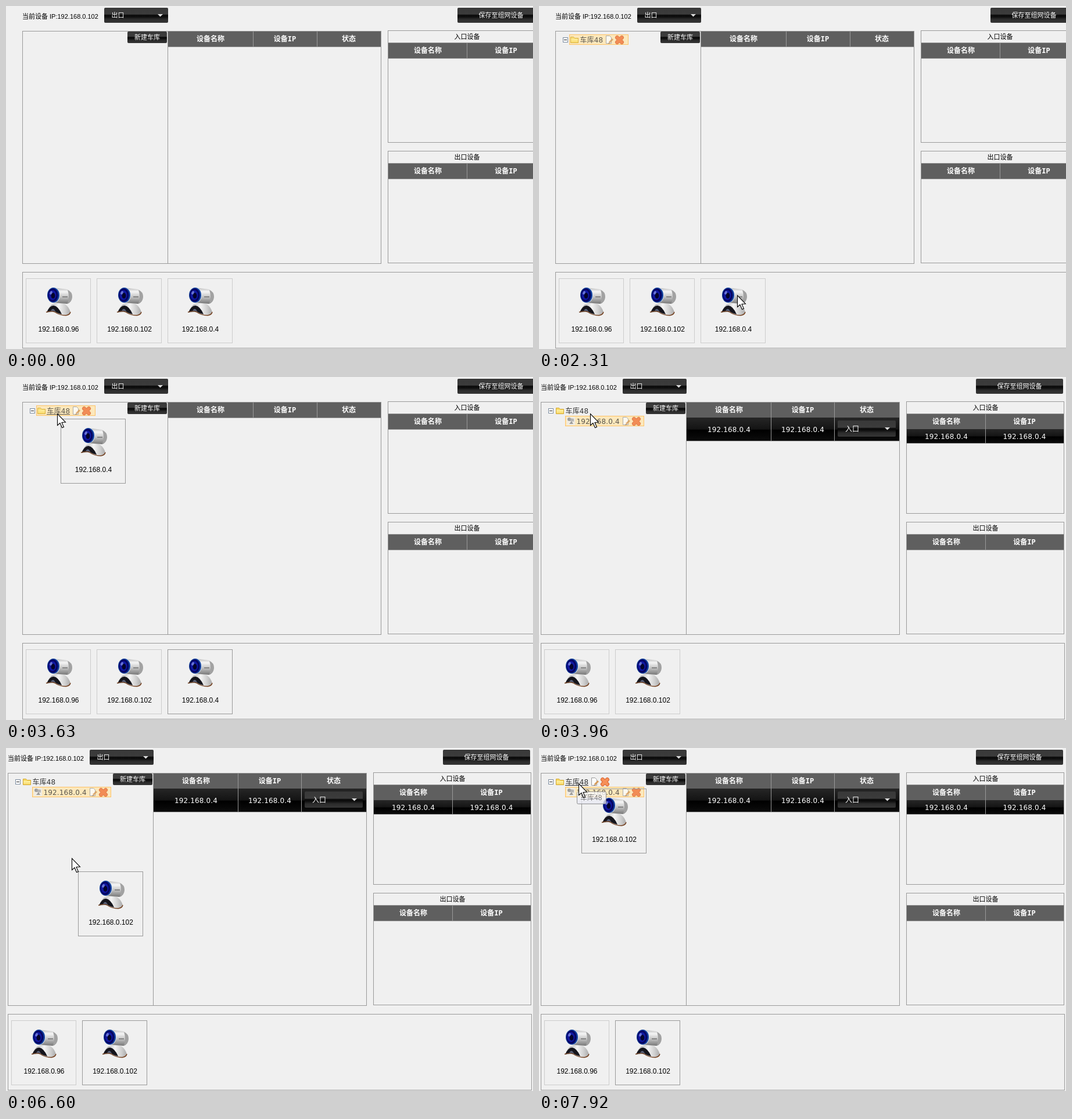
Write an HTML page with a canvas that moves like this. It is 907 px wide and 592 px high and loops after 8000 ms.

```html
<!DOCTYPE html>
<html lang="zh">
<head>
<meta charset="utf-8">
<title>设备组网</title>
<style>
html, body { margin: 0; width: 100%; height: 100%; overflow: hidden; background: #f0f0f0; }
canvas { display: block; }
</style>
</head>
<body>
<canvas id="stage" width="907" height="592"></canvas>
<script>
const ctx = document.getElementById('stage').getContext('2d');
const STEP = 330, LOOP = 8000;
const LINE = '#999', BG = '#f0f0f0';
const CJK = '"Noto Sans CJK SC", "Noto Sans CJK", sans-serif';
const ARIAL = '"Liberation Sans", ' + CJK;
const WIDE = '"DejaVu Sans", ' + CJK;
const HEAD = 'bold 12px "DejaVu Sans Mono", ' + CJK;
const SMALL = '11px ' + ARIAL;

// Each step: cursor position, dragged tile position, extra state.
const steps = [
  {},
  { at: [33, 263] },
  { at: [190, 107] },
  { at: [231, 59], button: 'hover' },
  { at: [231, 59], button: 'press' },
  { at: [231, 59], button: 'hover' },
  { at: [294, 270] },
  { at: [341, 499] },
  { at: [322, 475], drag: [329, 490] },
  { at: [149, 159], drag: [160, 189] },
  { at: [93, 72], drag: [100, 83] },
  { at: [88, 63], drag: [94, 72], hover: true },
  { at: [88, 63] },
  { at: [100, 85] },
  { at: [128, 157] },
  { at: [142, 376] },
  { at: [151, 481] },
  { at: [180, 532] },
  { at: [178, 520], drag: [186, 535] },
  { at: [160, 445], drag: [166, 468] },
  { at: [113, 190], drag: [124, 213] },
  { at: [82, 101], drag: [90, 115] },
  { at: [72, 65], drag: [77, 74], hover: true },
  { at: [68, 61], drag: [73, 70], hover: true },
  { at: [68, 61], drag: [73, 70], hover: true, tip: true }
];
const NODE_STEP = 5, DROP_STEP = 12;

function text(str, x, y, font, color = '#000', align = 'left', spacing = 0) {
  ctx.font = font;
  ctx.fillStyle = color;
  ctx.textAlign = align;
  ctx.letterSpacing = spacing + 'px';
  ctx.fillText(str, x, y);
}

function fill(x, y, w, h, color) {
  ctx.fillStyle = color;
  ctx.fillRect(x, y, w, h);
}

function frame(x, y, w, h, color = LINE) {
  ctx.strokeStyle = color;
  ctx.lineWidth = 1;
  ctx.strokeRect(x + 0.5, y + 0.5, w - 1, h - 1);
}

function shade(x0, y0, x1, y1, ...stops) {
  const g = ctx.createLinearGradient(x0, y0, x1, y1);
  stops.forEach(([p, c]) => g.addColorStop(p, c));
  return g;
}

function poly(points, color, stroke) {
  ctx.beginPath();
  points.forEach(([x, y]) => ctx.lineTo(x, y));
  ctx.closePath();
  if (color) { ctx.fillStyle = color; ctx.fill(); }
  if (stroke) { ctx.strokeStyle = stroke; ctx.stroke(); }
}

function path(d, color) {
  ctx.fillStyle = color;
  ctx.fill(new Path2D(d));
}

function oval(x, y, rx, ry, color, tilt = 0) {
  ctx.beginPath();
  ctx.ellipse(x, y, rx, ry, tilt, 0, Math.PI * 2);
  ctx.fillStyle = color;
  ctx.fill();
}

function pill(x, y, w, h, blue) {
  ctx.beginPath();
  ctx.roundRect(x, y, w, h, 2);
  ctx.fillStyle = blue
    ? shade(0, y, 0, y + h, [0, '#0a6cb4'], [0.47, '#0b6fb0'], [0.53, '#005a9c'], [1, '#0068ae'])
    : shade(0, y, 0, y + h, [0, '#383838'], [0.42, '#3c3c3c'], [0.5, '#080808'],
        [0.62, '#111'], [0.76, '#2b2b2b'], [1, '#363636']);
  ctx.fill();
}

function arrow(x, y) {
  poly([[x - 4.5, y], [x + 4.5, y], [x, y + 4.5]], '#ddd');
}

function header(x, y, w, dividers, labels) {
  fill(x, y, w, 26, '#5f5f5f');
  fill(x, y + 26, w, 1, LINE);
  dividers.forEach(d => fill(d, y, 1, 26, LINE));
  labels.forEach(([s, c]) => text(s, c, y + 17, HEAD, '#fff', 'center'));
}

function darkRow(x, y, w, h, dividers) {
  fill(x, y, w, h, shade(0, y, 0, y + h, [0, '#262626'], [0.5, '#141414'], [0.54, '#000'], [1, '#0c0c0c']));
  dividers.forEach(d => fill(d, y, 1, h, LINE));
}

function address(str, x, y, color, align) {
  text(str, x, y, '12px ' + WIDE, color, align, 0.15);
}

function camera() {
  // stand
  path('M45 45 Q56 39 68 45 Q75 50 77 59 Q76 64 68 64 Q55 63 49 58 L36 59 Q40 49 45 45Z',
    shade(40, 0, 77, 0, [0, '#aaa'], [0.45, '#f4f4f4'], [0.75, '#d0d0d0'], [1, '#aaa']));
  path('M36 59 Q41 47 48 47 Q56 48 62 62 Q55 61 50 57 Q43 56 36 59Z', '#15151c');
  path('M43 56 Q47 49 51 57Z', '#586078');
  ctx.lineWidth = 1.4;
  ctx.strokeStyle = '#74401f';
  ctx.stroke(new Path2D('M35 58.5 Q43 55.5 50 58 Q58 64 69 64 Q76 63 77 58'));
  // barrel
  path('M47 16 L71 19 Q80 22 80 32 Q79 42 71 44 L47 42Z',
    shade(0, 16, 0, 44, [0, '#b8b8b8'], [0.25, '#f6f6f6'], [0.55, '#c8c8c8'], [1, '#777']));
  path('M72 20 Q80 23 80 32 Q79 41 72 43 Q76 32 72 20Z', '#a2a2a2');
  fill(63, 31, 9, 2, '#858585');
  // lens
  oval(49, 29, 10, 13, '#d9e7f4');
  oval(47.5, 29, 10.5, 13, '#123f9a');
  oval(46.8, 29, 8.8, 11.5, '#050563');
  oval(46, 29, 6.5, 8.5, '#1018a0');
  oval(47, 30, 3.4, 5, '#05052c');
  oval(43.5, 25, 2, 3, '#6874d4', 0.5);
}

function tile(ip, x, y, active) {
  ctx.save();
  ctx.translate(x, y);
  frame(0, 0, 112, 112, active ? LINE : '#ccc');
  camera();
  text(ip, 56.5, 92, '12px ' + ARIAL, '#000', 'center');
  ctx.restore();
}

function folder(x, y) {
  poly([[x + 0.5, y + 11.5], [x + 0.5, y + 1.5], [x + 5.5, y + 1.5], [x + 7.5, y + 3.5],
    [x + 13.5, y + 3.5], [x + 13.5, y + 11.5]], '#f7d968', '#d3a72c');
  fill(x + 1, y + 5, 12, 6, shade(0, y + 5, 0, y + 11, [0, '#fff3a8'], [1, '#f8d766']));
}

function editIcons(x, y) {
  poly([[x + 1.5, y + 0.5], [x + 7.5, y + 0.5], [x + 10.5, y + 3.5], [x + 10.5, y + 13.5],
    [x + 1.5, y + 13.5]], '#fbfbfb', '#999');
  ctx.lineWidth = 3;
  ctx.strokeStyle = '#d79b58';
  ctx.stroke(new Path2D(`M${x + 7} ${y + 12} L${x + 13} ${y + 6}`));
  ctx.lineWidth = 1;
  ctx.strokeStyle = '#805830';
  ctx.stroke(new Path2D(`M${x + 5} ${y + 13.5} L${x + 8} ${y + 13}`));
  const cross = new Path2D(`M${x + 20.5} ${y + 3.5} L${x + 28.5} ${y + 11.5} M${x + 28.5} ${y + 3.5} L${x + 20.5} ${y + 11.5}`);
  ctx.lineCap = 'round';
  [[7, '#d96532'], [5, '#f68f58']].forEach(([w, c]) => {
    ctx.lineWidth = w;
    ctx.strokeStyle = c;
    ctx.stroke(cross);
  });
  ctx.lineCap = 'butt';
  ctx.lineWidth = 1;
}

function selection(x, y, w, h) {
  fill(x, y, w, h, '#ffe6b0');
  frame(x, y, w, h, '#ffb951');
}

function tree(dropped, hover) {
  fill(17, 55, 7, 7, '#fff');
  frame(16, 54, 9, 9, '#7c8ca0');
  fill(18, 58, 5, 1, '#222');
  ctx.save();
  if (!dropped) {
    ctx.globalAlpha = 0.8;
    selection(27, 49, 102, 18);
  }
  folder(29, 52);
  address('车库48', 45.5, 62.5, '#333');
  if (hover) fill(45, 64, 40, 1, '#333');
  if (!dropped || hover) editIcons(89, 51);
  ctx.restore();
  if (!dropped) return;
  ctx.save();
  ctx.globalAlpha = 0.8;
  selection(45, 67, 136, 18);
  fill(48, 69, 14, 14, '#eee');
  oval(52, 73, 3, 3, '#888');
  path('M52 71 L60 72 L60 77 L53 76Z', '#aaa');
  path('M52 81 L56 76 L59 81Z', '#888');
  address('192.168.0.4', 64.5, 80.5, '#333');
  editIcons(143, 69);
  ctx.restore();
}

function sidePanel(y, title) {
  frame(632, y, 272, 194);
  text(title, 768.5, y + 14.5, SMALL, '#000', 'center');
  fill(633, y + 21, 270, 1, LINE);
  header(633, y + 22, 270, [768], [['设备名称', 701], ['设备IP', 835.5]]);
}

function page(n, step) {
  const dropped = n >= DROP_STEP;
  text('当前设备 IP:192.168.0.102', 3, 22, SMALL);
  pill(144, 3, 110, 26);
  text('出口', 156.5, 20, SMALL, '#fff');
  arrow(240.5, 14);
  pill(752, 3, 150, 26);
  text('保存至组网设备', 827, 20, SMALL, '#fff', 'center');

  frame(3, 43, 618, 402);
  fill(253, 43, 1, 402, LINE);
  const cols = dropped ? [399, 508] : [400, 510];
  const mid = dropped ? 454 : 455;
  header(254, 44, 366, cols, [['设备名称', 327], ['设备IP', mid], ['状态', mid + 110]]);

  const press = step.button === 'press' ? 1 : 0;
  pill(184, 44, 68, 20, step.button);
  text('新建车库', 218 + press, 58 + press, SMALL, '#fff', 'center');

  if (n >= NODE_STEP) tree(dropped, step.hover);
  sidePanel(42, '入口设备');
  sidePanel(250, '出口设备');

  if (dropped) {
    darkRow(254, 70, 366, 40, cols);
    fill(254, 110, 366, 1, LINE);
    address('192.168.0.4', 327, 95, '#fff', 'center');
    address('192.168.0.4', 454, 95, '#fff', 'center');
    pill(514, 75, 100, 28);
    text('入口', 527, 93.5, '12px ' + CJK, '#fff');
    arrow(599.5, 87);
    darkRow(633, 90, 270, 24, [768]);
    fill(633, 114, 270, 1, LINE);
    address('192.168.0.4', 701, 107, '#fff', 'center');
    address('192.168.0.4', 835.5, 107, '#fff', 'center');
  }

  frame(3, 459, 902, 132);
  const ips = ['192.168.0.96', '192.168.0.102', '192.168.0.4'].slice(0, dropped ? 2 : 3);
  ips.forEach((ip, i) => tile(ip, 9 + 122 * i, 470, step.drag && i === ips.length - 1));
  return ips[ips.length - 1];
}

function tooltip(x, y) {
  ctx.save();
  ctx.globalAlpha = 0.78;
  ctx.beginPath();
  ctx.roundRect(x + 0.5, y + 0.5, 50, 21, 2);
  ctx.fillStyle = shade(0, y, 0, y + 21, [0, '#fff'], [1, '#e4e5f0']);
  ctx.fill();
  ctx.strokeStyle = '#767676';
  ctx.stroke();
  text('车库48', x + 6, y + 15, '12px ' + ARIAL, '#575757');
  ctx.restore();
}

function pointer(x, y) {
  ctx.save();
  ctx.translate(x + 0.5, y + 0.5);
  ctx.lineWidth = 1.1;
  poly([[0, 0], [0, 20], [4.5, 16], [8, 24], [11, 23], [7.5, 15], [14, 14.5]], '#fff', '#000');
  ctx.restore();
}

function draw(now) {
  const n = Math.min(Math.floor((now % LOOP) / STEP), steps.length - 1);
  const step = steps[n];
  fill(0, 0, 907, 592, BG);
  ctx.save();
  if (n < DROP_STEP) ctx.translate(25, 0);
  const dragged = page(n, step);
  ctx.restore();
  if (step.drag) tile(dragged, ...step.drag, true);
  if (step.tip) tooltip(65, 75);
  if (step.at) pointer(...step.at);
  requestAnimationFrame(draw);
}
requestAnimationFrame(draw);
</script>
</body>
</html>
```
